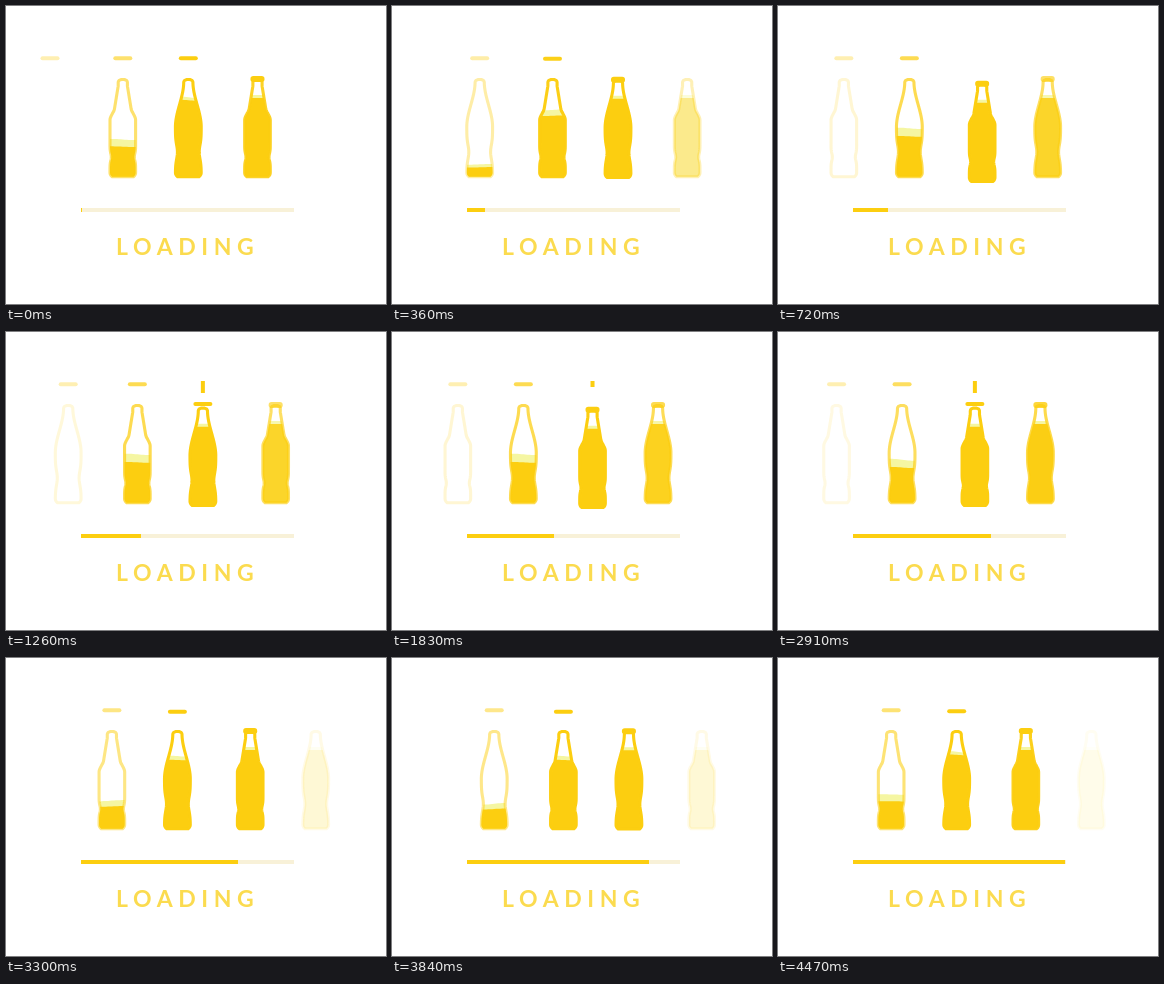
An HTML page with a canvas that plays this animation: 380x298 px, repeating every 4500 ms.

```html
<!DOCTYPE html>
<html lang="en">
<head>
<meta charset="utf-8">
<title>Loading</title>
<style>
  html, body { margin: 0; width: 100%; height: 100%; overflow: hidden; background: #fff; }
  canvas { display: block; }
  p {
    position: absolute; left: 110px; top: 228px; margin: 0;
    font: 700 23px/24px Lato, sans-serif; letter-spacing: 5.6px;
    color: #fbdb4f; white-space: nowrap;
  }
</style>
</head>
<body>
<canvas width="380" height="298"></canvas>
<p>LOADING</p>
<script>
const ctx = document.querySelector('canvas').getContext('2d');
const GOLD = '#fcce10', FOAM = '#f5f6a2', TRACK = '#f8f1d8';
const STEP = 30, STEPS = 150, PAIRS = 4, LIFE = 75, SPEED = 3.64;
const TOP = 73.5, BOTTOM = 171.6;
const HIT = 41.5; // age, in steps, at which the cap meets the bottle

const clamp = v => Math.max(0, Math.min(1, v));
const ramp = (a, b, v) => clamp((v - a) / (b - a));
const smooth = (a, b, v) => { const t = ramp(a, b, v); return t * t * (3 - 2 * t); };
const bump = (centre, spread, v) => Math.exp(-(((v - centre) / spread) ** 2));
const corner = (d, r) => d < r ? r - Math.sqrt(r * r - (r - d) ** 2) : 0;

// Half-width of each bottle at height y.
const straightWidth = y =>
  4.6 + 4.4 * ramp(80, 107, y) + 3.8 * smooth(103, 114, y) - 1.3 * bump(151, 5, y);
const curvedWidth = y =>
  4.6 + 8.3 * smooth(76, 121, y) - 2 * bump(146, 10, y);

function outline(width) {
  const side = [];
  for (let y = TOP; y <= BOTTOM; y += 0.9) {
    side.push([width(y) - corner(y - TOP, 3) - corner(BOTTOM - y, 5), y]);
  }
  const path = new Path2D();
  side.forEach(([w, y]) => path.lineTo(w, y));
  side.reverse().forEach(([w, y]) => path.lineTo(-w, y));
  path.closePath();
  return path;
}

const shapes = [outline(curvedWidth), outline(straightWidth)];
const launches = [];
for (let i = 0; i < PAIRS; i++) {
  const start = Math.floor(i * STEPS / PAIRS);
  shapes.forEach((shape, j) => launches.push({ start: start + 18 * j, shape }));
}

function pill(x, y, w, h, r) {
  ctx.beginPath();
  ctx.roundRect(x - w / 2, y, w, h, r);
  ctx.fill();
}

function liquid(top, slope, colour) {
  ctx.fillStyle = colour;
  ctx.beginPath();
  ctx.moveTo(-16, 180);
  for (let x = -16; x <= 16; x += 2) ctx.lineTo(x, top + slope * Math.sin(x / 8));
  ctx.lineTo(16, 180);
  ctx.fill();
}

function drawLiquid(k, shape) {
  const level = Math.max(92, 151 - 2.58 * (k - 16));
  const foam = Math.max(3, 8 * Math.sin(Math.PI * ramp(9, 40, k)));
  const slope = k < 40 ? Math.sin(0.42 * (k - 18.5)) : 0;
  ctx.save();
  ctx.clip(shape);
  ctx.globalAlpha = clamp((LIFE - k) / 15.5);
  liquid(level - foam, slope, FOAM);
  liquid(level, slope * 0.6, GOLD);
  ctx.restore();
}

function drawCap(k) {
  ctx.fillStyle = GOLD;
  if (k > HIT + 1) {
    ctx.globalAlpha = clamp((69 - k) / 11);
    pill(0, 70, 14, 6, 2.8);
    return;
  }
  const lift = ramp(30, 40, k);
  const fall = 10.5 * Math.max(0, k - 40);
  ctx.globalAlpha = Math.max(0.32, clamp(k / 33));
  pill(0, 50.2 + 19 * lift * lift * (0.8 - lift) + fall, 19, 4, 2);
}

function drawBottle(k, shape) {
  const since = Math.max(0, k - HIT) / 2;
  const bounce = 5 * since * Math.exp(1 - since);

  ctx.save();
  ctx.translate(44 + SPEED * k, 0);
  // Trail left by the falling cap.
  if (k > HIT && k < 44) {
    ctx.fillStyle = GOLD;
    ctx.fillRect(-2, 49, 4, 6 * (44 - k));
  }
  ctx.translate(0, bounce);
  if (k > 9) drawLiquid(k, shape);
  ctx.globalAlpha = Math.min(clamp(k / 33), clamp((LIFE - k) / 20));
  ctx.strokeStyle = GOLD;
  ctx.lineWidth = 3.1;
  ctx.stroke(shape);
  drawCap(k);
  ctx.restore();
}

function draw(now) {
  const step = Math.floor(now / STEP) % STEPS;
  ctx.clearRect(0, 0, 380, 298);
  for (const { start, shape } of launches) {
    const k = (step - start + STEPS) % STEPS;
    if (k < LIFE) drawBottle(k, shape);
  }
  ctx.fillStyle = TRACK;
  ctx.fillRect(75, 202, 213, 4);
  ctx.fillStyle = GOLD;
  ctx.fillRect(75, 202, Math.max(1, Math.ceil(213 * step / STEPS)), 4);
}

let origin;
function tick(now) {
  origin ??= now;
  draw(now - origin);
  requestAnimationFrame(tick);
}
draw(0);
requestAnimationFrame(tick);
</script>
</body>
</html>
```
